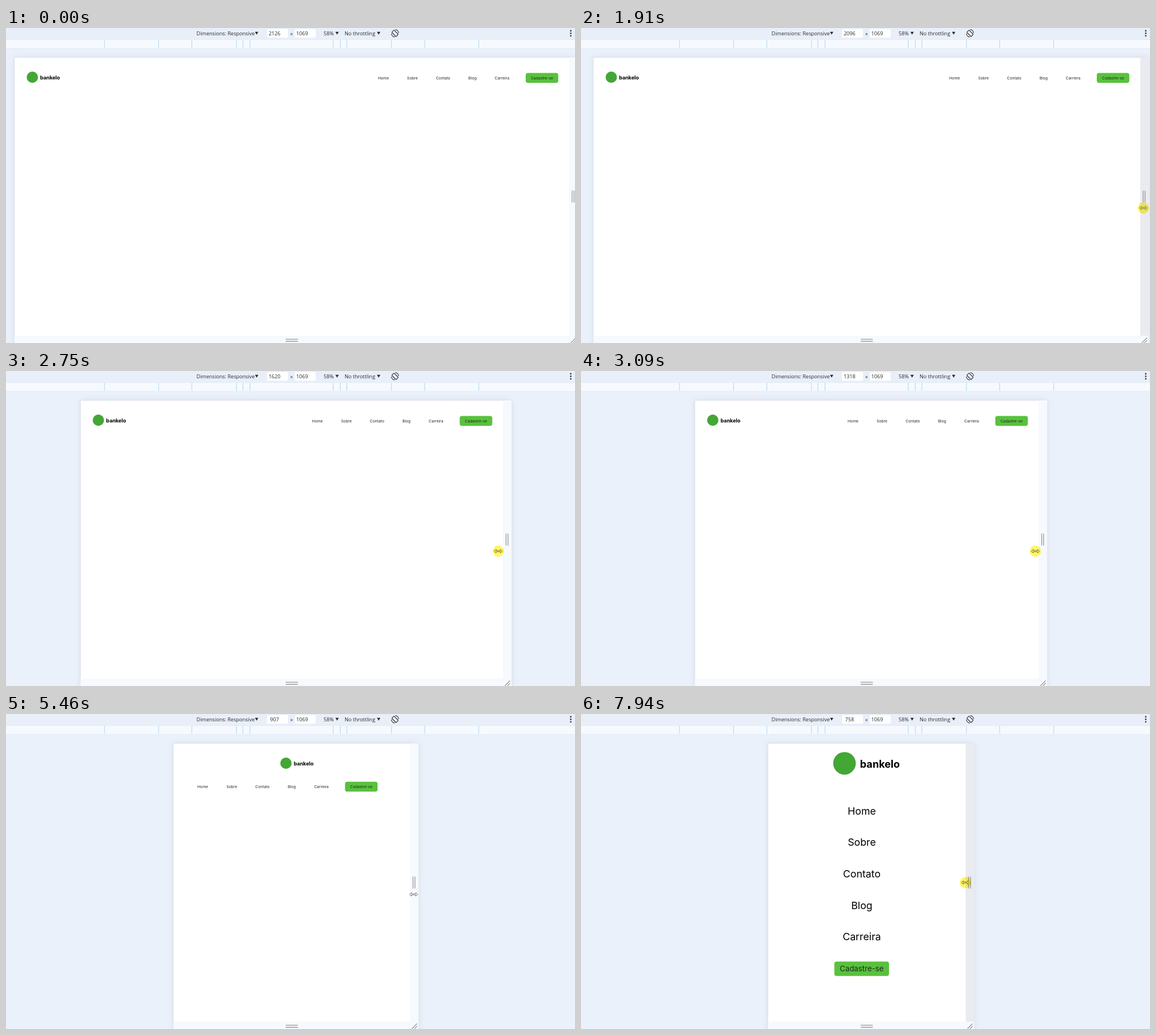
An HTML page that plays this animation: 1005 by 557 pixels, repeating every 8 s.

```html
<!DOCTYPE html>
<html lang="pt">
<head>
<meta charset="utf-8">
<title>Responsive header</title>
<style>
html, body { margin: 0; width: 100%; height: 100%; overflow: hidden; }
svg { display: block; width: 1005px; height: 557px; background: #ebf1fa; }
.bar { font: 9.1px "Open Sans", "Noto Sans", sans-serif; fill: #2b2b2b; }
.page { font: 6.75px Inter, sans-serif; fill: #1d2a1d; }
.brand { font-size: 9.05px; font-weight: 700; fill: #000; }
.large { font-size: 17.8px; fill: #000; }
.mid { text-anchor: middle; }
.grip { stroke: #999; stroke-width: 1.3; fill: none; }
#frame { filter: drop-shadow(0 0 5px rgba(60, 80, 120, .13)); }
#press { mix-blend-mode: multiply; }
</style>
</head>
<body>
<svg viewBox="0 0 1005 557">
  <rect width="1005" height="20" fill="#e9eff9"/>
  <rect y="20" width="1005" height="16" fill="#f6fafe"/>
  <path d="M0 20.5H1005M0 36H1005" stroke="#dfe7f1" stroke-width=".8"/>
  <path id="ticks" stroke="#bfdcf2" stroke-width="1.3"/>

  <g class="bar">
    <rect x="461" y="2" width="37" height="15" rx="2" fill="#fff"/>
    <rect x="510" y="2" width="37" height="15" rx="2" fill="#fff"/>
    <text x="336.5" y="12.8">Dimensions: Responsive</text>
    <text id="width" class="mid" x="474.3" y="12.8">2126</text>
    <text class="mid" x="504.3" y="14">×</text>
    <text class="mid" x="523" y="12.8">1069</text>
    <text x="561" y="12.8">58%</text>
    <text x="598" y="12.8">No throttling</text>
    <path d="M439.7 6.8h6l-3 5zM581.8 6.8h6l-3 5zM655.2 6.8h6l-3 5z"/>
    <g fill="none" stroke="#333" stroke-width="1.2">
      <rect x="684.3" y="4" width="5.6" height="10.8" rx="1" transform="rotate(-45 687.1 9.4)"/>
      <path d="M687.5 2.9a6.5 6.5 0 0 1 6 6M686.7 15.9a6.5 6.5 0 0 1-6-6"/>
    </g>
    <path d="M997.5 5v0M997.5 9.4v0M997.5 13.8v0" stroke="#333" stroke-width="2.8" stroke-linecap="round"/>
  </g>

  <rect id="frame" y="52" height="510" fill="#f6f9fd"/>
  <rect id="side" y="52" width="15" height="492" fill="#e9ebef"/>
  <rect id="sheet" y="52" height="492" fill="#fff"/>
  <path id="edge" fill="none" stroke="#d9e0e9" stroke-width=".9"/>
  <path class="grip" d="M494 550.4h21.5M494 554h21.5"/>
  <path id="grips" class="grip" d="M5.3 287.5v21M8.7 287.5v21M3.3 556.5l9-9M7.8 556.5l4.5-4.5"/>

  <g class="page">
    <g id="logo">
      <circle r="10" fill="#43a736"/>
      <text class="brand" x="13.7" y="3.7">bankelo</text>
    </g>
    <g id="row"></g>
    <g id="column"></g>
  </g>

  <g id="cursor">
    <circle id="touch" r="8.2" fill="#8c8c8c" stroke="#c9c9c9" stroke-width="1.4"/>
    <circle id="arrows-back" r="0"/>
    <path id="arrows" d="M-7.3 0L-3.8-3.1V-1H3.8V-3.1L7.3 0L3.8 3.1V1H-3.8V3.1Z" fill="#fff" stroke="#555" stroke-width=".8"/>
  </g>
  <circle id="press" r="10" fill="#fff568"/>
</svg>
<script>
const $ = id => document.getElementById(id);
const set = (id, attrs) => { for (const k in attrs) $(id).setAttribute(k, attrs[k]); };
const show = (id, on) => set(id, { display: on ? 'inline' : 'none' });

const LOOP = 8000, STEP = 67, LAG = 70, CENTER = 504.7, HALF_SCALE = 0.2304;
const items = ['Home', 'Sobre', 'Contato', 'Blog', 'Carreira'];

// Moves: [start, end, ...values]; each one starts from the values before it.
const resize = [
  [0, 0, 2126], [1640, 1910, 2096], [1910, 2410, 1922], [2410, 3090, 1318], [3090, 3350, 1121],
  [3350, 3700, 998], [3700, 3980, 958], [4240, 4450, 907], [7530, 8000, 733]
];
const pointer = [
  [0, 0, 942, 543], [450, 820, 948, 380], [820, 1120, 1000, 318], [1120, 4450, 720, 319],
  [5400, 5870, 567, 146], [6010, 6120, 559.5, 128.5], [6400, 6600, 601.5, 229.5],
  [6600, 6860, 702, 288], [7000, 7400, 719, 298]
];

function sample(moves, t) {
  let now = moves[0].slice(2);
  for (const [start, end, ...to] of moves) {
    if (t < start || end === 0) continue;
    const n = Math.round((end - start) / STEP);
    const u = Math.min(1, Math.floor((t - start) / (end - start) * n) / n);
    now = now.map((v, i) => v + (to[i] - v) * u);
  }
  return now;
}

const rightEdge = t => CENTER + sample(resize, t)[0] * HALF_SCALE;

const button = (x, y, w, h, size) =>
  `<rect x="${x}" y="${y}" width="${w}" height="${h}" rx="4" fill="#59c13d"/>
   <text class="mid" x="${x + w / 2}" y="${y + h / 2 + size * .36}" style="font-size:${size}px">Cadastre-se</text>`;

function build() {
  // Ruler marks stand at common device widths, mirrored about the centre.
  $('ticks').setAttribute('d', [320, 375, 425, 768, 1024, 1440].map(w =>
    `M${504.5 - w * .2295} 21v14M${504.5 + w * .2295} 21v14`).join(''));

  $('row').innerHTML = items.map(s => `<text y="2.5">${s}</text>`).join('') + button(260.7, -8.7, 57.5, 17.5, 6.7);
  let x = 0;
  for (const text of [...$('row').children].slice(0, items.length)) {
    text.setAttribute('x', x);
    x += text.getComputedTextLength() + 32.2;
  }
  $('column').innerHTML = items.map((s, i) =>
    `<text class="mid large" x="496" y="${177.6 + i * 55.7}">${s}</text>`).join('')
    + button(447.5, 437.8, 96.5, 25.4, 13.3);
}

function layout(width, left, right) {
  const narrow = width <= 768, stacked = width <= 992;
  show('row', !narrow);
  show('column', narrow);
  set('logo', { transform: narrow ? 'translate(465.4 87.2) scale(2)'
    : `translate(${stacked ? CENTER - 10.2 : left + 31.7} 87)` });
  set('row', { transform: stacked ? `translate(${CENTER - 166.6} 128.4)` : `translate(${right - 337.3} 88.3)` });
}

function drawCursor(t, right) {
  const onGrip = t >= 1120 && t < 5400 || t >= 7400;
  const pressed = t >= 1520 && t < 4450 || t >= 7600;
  let [x, y] = sample(pointer, t);
  // While dragging, the page trails a little behind the pointer.
  if (onGrip) x = rightEdge(t + LAG) + 5.5;
  const transform = `translate(${x} ${y})`;
  set('cursor', { transform });
  set('press', { transform });
  show('cursor', t >= 450);
  show('press', pressed);
  show('touch', !onGrip && x < right);
  show('arrows', onGrip || x >= right);
}

function draw(t) {
  const [width] = sample(resize, t);
  const right = rightEdge(t), left = 2 * CENTER - right;
  $('width').textContent = Math.round(width);
  set('frame', { x: left, width: right - left + 15 });
  set('sheet', { x: left, width: right - left });
  set('side', { x: right });
  show('side', t >= 1710 && t < 2550 || t >= 7600);
  set('edge', { d: `M${left} 544V52H${right}` });
  set('grips', { transform: `translate(${right} 0)` });
  layout(width, left, right);
  drawCursor(t, right);
}

build();
const start = performance.now();
(function tick() {
  draw((performance.now() - start) % LOOP);
  requestAnimationFrame(tick);
})();
</script>
</body>
</html>
```
